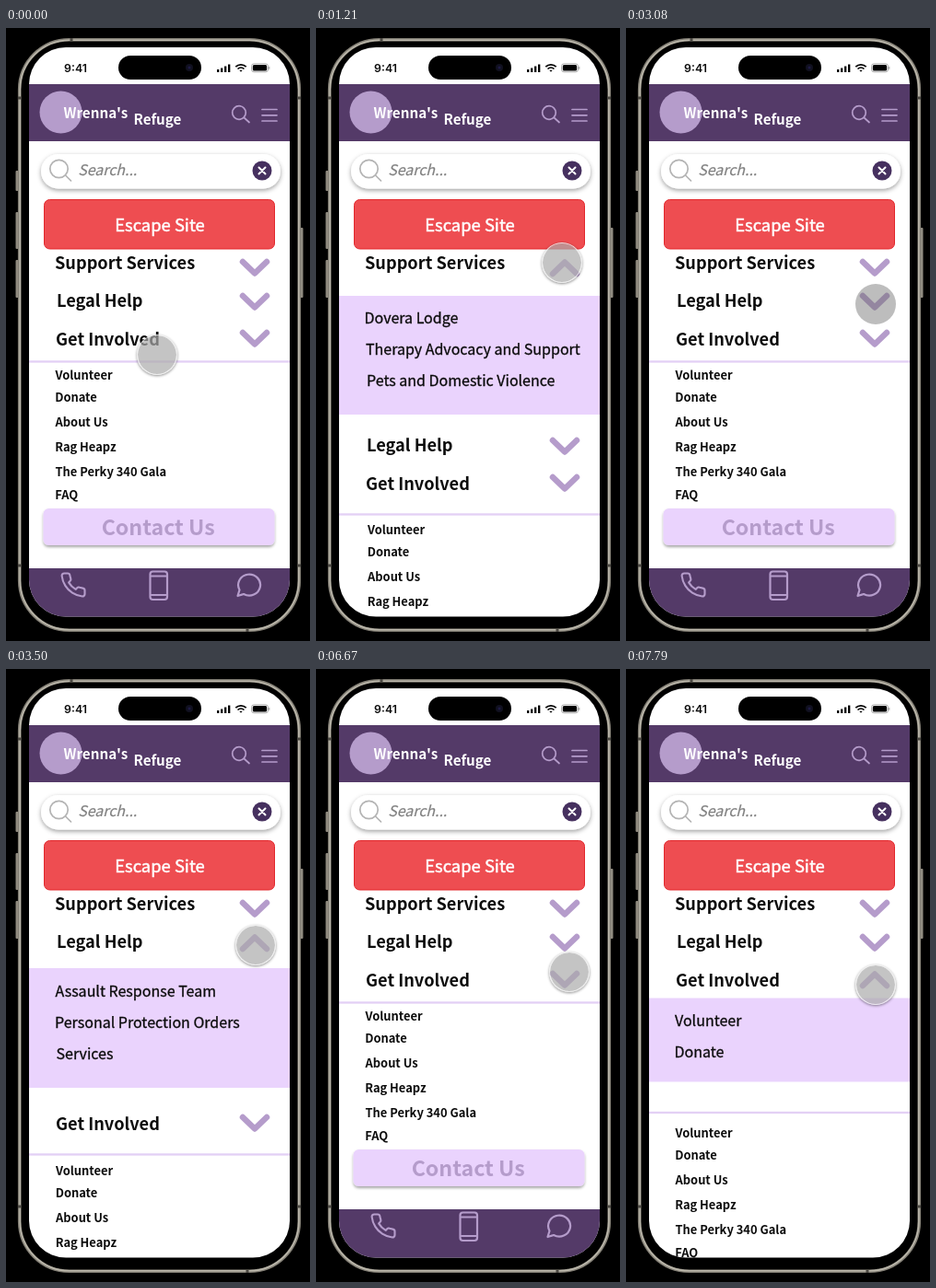
Animation, 330 px wide and 666 px high, one loop 8 s. Source, as an HTML page:

```html
<!DOCTYPE html>
<html lang="en">
<head>
<meta charset="utf-8">
<title>Accordion menu</title>
<style>
  /* Open amount of each section, and whether the pointer is pressed */
  @property --services { syntax: "<number>"; inherits: true; initial-value: 0; }
  @property --legal { syntax: "<number>"; inherits: true; initial-value: 0; }
  @property --involved { syntax: "<number>"; inherits: true; initial-value: 0; }
  @property --press { syntax: "<number>"; inherits: true; initial-value: 0; }

  html, body { margin: 0; width: 100%; height: 100%; overflow: hidden; background: #000; }
  body {
    --ease: cubic-bezier(.2, .6, .35, 1);
    position: relative;
    animation: services 8s var(--ease) infinite, legal 8s var(--ease) infinite,
      involved 8s var(--ease) infinite, press 8s step-end infinite;
  }
  svg { position: absolute; left: 0; top: 0; display: block; }

  @keyframes services {
    0%, 12% { --services: 0; }
    15.1%, 26.13% { --services: 1; }
    27.63%, 100% { --services: 0; }
  }
  @keyframes legal {
    0%, 40.63% { --legal: 0; }
    43.7%, 76.13% { --legal: 1; }
    77.63%, 100% { --legal: 0; }
  }
  @keyframes involved {
    0%, 94.25% { --involved: 0; }
    97.35%, 100% { --involved: 1; }
  }
  @keyframes press {
    0%, 13.1%, 26.6%, 40.6%, 76.6%, 92.7%, 100% { --press: 0; }
    11%, 24.45%, 38.5%, 74.45%, 90.6% { --press: 1; }
  }

  .services { opacity: var(--services); }
  .legal { opacity: var(--legal); }
  .involved { opacity: var(--involved); }
  .row-legal { transform: translateY(calc(var(--services) * 157px)); }
  .row-involved { transform: translateY(calc(var(--services) * 157px + var(--legal) * 156px)); }
  .rule { transform: translateY(calc(var(--services) * 166px + var(--legal) * 165px + var(--involved) * 119.5px)); }
  .links {
    transform: translate(
      calc(var(--services) * 2.5px + var(--legal) * .5px),
      calc(var(--services) * 168px + var(--legal) * 167.5px + var(--involved) * 127px));
  }
  .flip-services { transform: rotate(calc(var(--services) * 180deg)); }
  .flip-legal { transform: rotate(calc(var(--legal) * 180deg)); }
  .flip-involved { transform: rotate(calc(var(--involved) * 180deg)); }

  text { font-family: "Noto Sans CJK JP", "Noto Sans CJK SC", "Noto Sans CJK", "Noto Sans", sans-serif; fill: #0c0c0c; }
  .head { font-size: 18.2px; font-weight: 700; }
  .item { font-size: 16px; stroke: #0c0c0c; stroke-width: .3; }
  .link { font-size: 12.9px; font-weight: 700; }
  .brand { font-size: 15.2px; font-weight: 700; fill: #fff; }
  .contact { font-size: 23.2px; font-weight: 700; fill: #b59ccb; }
  .escape { font-size: 18.4px; fill: #fff; stroke: #fff; stroke-width: .5; }
  .hint { font-size: 15.9px; font-style: italic; fill: #808080; stroke: #808080; stroke-width: .2; }
  .clock { font: 600 12.3px Inter, "Liberation Sans", sans-serif; }
  .mid { text-anchor: middle; }
  .icon { fill: none; stroke: #b59ccb; stroke-width: 1.7; stroke-linecap: round; stroke-linejoin: round; }
  .bold { stroke-width: 2.2; }
  .plum { fill: #543a68; }
  .lilac { fill: #b59ccb; }
  .pale { fill: #ead3fd; }

  .pointer {
    position: absolute; left: -22px; top: -22px; width: 44px; height: 44px;
    animation: move 8s linear infinite;
  }
  .pointer i { position: absolute; inset: 0; border-radius: 50%; box-sizing: border-box; }
  .rest {
    opacity: calc(1 - var(--press));
    background: rgba(171, 171, 171, .7); background-clip: padding-box;
    border: 1px solid rgba(235, 235, 235, .9);
    box-shadow: 0 1px 3px rgba(0, 0, 0, .45);
  }
  .pressed { opacity: var(--press); background: rgba(110, 110, 110, .45); }
  @keyframes move {
    0%, 2.25% { transform: translate(164px, 355px); }
    3.9% { transform: translate(153.2px, 363px); }
    4.9% { transform: translate(154.2px, 356.6px); }
    5.56% { transform: translate(171px, 335.8px); }
    6.23% { transform: translate(199px, 307px); }
    7.23% { transform: translate(238.7px, 273.8px); }
    8.88%, 28.63% { transform: translate(267px, 255px); }
    30.31% { transform: translate(272.6px, 256px); }
    31.25% { transform: translate(278px, 261px); }
    32.68% { transform: translate(279.4px, 282px); }
    34.2% { transform: translate(275px, 295px); }
    36.88%, 81.25% { transform: translate(271px, 300px); }
    83.38% { transform: translate(275px, 329px); }
    85% { transform: translate(274px, 339px); }
    88.5%, 100% { transform: translate(271px, 343px); }
  }
</style>
</head>
<body>
<svg width="330" height="666" viewBox="0 0 330 666">
  <defs>
    <clipPath id="screen"><rect x="25" y="21" width="283" height="618.5" rx="40"/></clipPath>
    <path id="chevron" d="M-13-6.5 0 6 13-6.5" fill="none" stroke="#b59ccb" stroke-width="6.5" stroke-linecap="round" stroke-linejoin="round"/>
    <filter id="soft" x="-10%" y="-30%" width="120%" height="170%">
      <feDropShadow dx="0" dy="2" stdDeviation="1.8" flood-opacity=".35"/>
    </filter>
    <filter id="wide" x="-10%" y="-40%" width="120%" height="190%">
      <feDropShadow dx="0" dy="2" stdDeviation="2.8" flood-opacity=".38"/>
    </filter>
  </defs>

  <!-- Phone body -->
  <rect width="330" height="666"/>
  <g fill="#928d82">
    <rect x="10.5" y="155" width="3" height="22" rx="1"/>
    <rect x="10.5" y="200" width="3" height="40" rx="1"/>
    <rect x="10.5" y="252" width="3" height="41" rx="1"/>
    <rect x="319.5" y="217" width="3" height="76" rx="1"/>
  </g>
  <rect x="14.7" y="12.7" width="303.6" height="641.6" rx="54" stroke="#858177" stroke-width="3.6"/>
  <rect x="15.2" y="13.2" width="302.6" height="640.6" rx="53.5" fill="none" stroke="#bab6aa" stroke-width="1.6"/>
  <path d="M12.9 76h3.6M316.5 76h3.6M12.9 584h3.6M316.5 584h3.6M71 10.9v3.6M262 652.5v3.6" stroke="#4b4842" stroke-width="3"/>

  <g clip-path="url(#screen)">
    <rect x="24" y="20" width="285" height="621" fill="#fff"/>

    <!-- Section panels -->
    <g class="services">
      <rect class="pale" x="25" y="291" width="283" height="129"/>
      <text class="item" x="52.5" y="321">Dovera Lodge</text>
      <text class="item" x="54" y="355">Therapy Advocacy and Support</text>
      <text class="item" x="55" y="389">Pets and Domestic Violence</text>
    </g>
    <g class="legal">
      <rect class="pale" x="25" y="325" width="283" height="130"/>
      <text class="item" x="53.5" y="356">Assault Response Team</text>
      <text class="item" x="53" y="390">Personal Protection Orders</text>
      <text class="item" x="54.5" y="424">Services</text>
    </g>
    <g class="involved">
      <rect class="pale" x="25" y="357.5" width="283" height="91"/>
      <text class="item" x="53" y="388">Volunteer</text>
      <text class="item" x="52.5" y="422">Donate</text>
    </g>

    <!-- Section rows -->
    <text class="head" x="53" y="262">Support Services</text>
    <g transform="translate(270 260.5)"><use class="flip-services" href="#chevron"/></g>
    <g class="row-legal">
      <text class="head" x="55" y="303">Legal Help</text>
      <g transform="translate(270 297.5)"><use class="flip-legal" href="#chevron"/></g>
    </g>
    <g class="row-involved">
      <text class="head" x="54" y="345">Get Involved</text>
      <g transform="translate(270 337.5)"><use class="flip-involved" href="#chevron"/></g>
    </g>

    <!-- Footer -->
    <rect class="rule" x="25" y="361.3" width="283" height="2.3" fill="#e3d0f5"/>
    <g class="links">
      <text class="link" x="53.5" y="382">Volunteer</text>
      <text class="link" x="53.2" y="406">Donate</text>
      <text class="link" x="53.5" y="433">About Us</text>
      <text class="link" x="53.2" y="460">Rag Heapz</text>
      <text class="link" x="53.5" y="487">The Perky 340 Gala</text>
      <text class="link" x="53.2" y="512">FAQ</text>
      <rect class="pale" x="40.5" y="522" width="251" height="40" rx="6" filter="url(#soft)"/>
      <text class="contact mid" x="165.2" y="551">Contact Us</text>
      <rect class="plum" x="20" y="587" width="292" height="60"/>
      <g class="icon bold">
        <path transform="translate(58 590) scale(1.25)" stroke-width="1.7" d="M22 17v3a2 2 0 0 1-2.2 2 19.8 19.8 0 0 1-8.6-3.1 19.5 19.5 0 0 1-6-6A19.8 19.8 0 0 1 2.1 4.2 2 2 0 0 1 4.1 2h3a2 2 0 0 1 2 1.7c.1 1 .4 1.9.7 2.8a2 2 0 0 1-.5 2.1L8.1 9.9a16 16 0 0 0 6 6l1.3-1.3a2 2 0 0 1 2.1-.4c.9.3 1.9.6 2.8.7A2 2 0 0 1 22 17z"/>
        <rect x="156.5" y="590.5" width="18.5" height="30.5" rx="3"/>
        <path d="M157 595.5h18M157 616h18"/>
        <path d="M251.5 617l2-6.5a12 11.5 0 1 1 4.5 4.5z"/>
      </g>
    </g>

    <!-- Header -->
    <rect class="plum" x="25" y="61" width="283" height="62"/>
    <circle class="lilac" cx="59.5" cy="91.5" r="23"/>
    <text class="brand" x="62.5" y="97.5">Wrenna's</text>
    <text class="brand" x="138.5" y="105">Refuge</text>
    <g class="icon">
      <circle cx="253" cy="92" r="7.3"/>
      <path d="M258.5 97.5l5.5 5M278 88.5h16M278 94.8h16M278 101h16"/>
    </g>

    <!-- Search -->
    <rect x="38" y="137" width="260" height="37.5" rx="18.75" fill="#fff" filter="url(#wide)"/>
    <g fill="none" stroke="#b4b4b4" stroke-width="1.7" stroke-linecap="round">
      <circle cx="57.5" cy="153" r="9.7"/>
      <path d="M64.5 160l6 6"/>
    </g>
    <text class="hint" x="78.3" y="160">Search...</text>
    <circle cx="278" cy="155" r="10.5" fill="#46305f"/>
    <path d="M274.5 151.5l7 7m0-7l-7 7" stroke="#fff" stroke-width="2" stroke-linecap="round"/>

    <rect x="41.5" y="186.5" width="250" height="53.5" rx="6" fill="#ee4d51" stroke="#e2262b"/>
    <text class="escape mid" x="167" y="221">Escape Site</text>

    <!-- Status bar -->
    <text class="clock mid" x="75.5" y="47.5">9:41</text>
    <rect x="122" y="30" width="90" height="26" rx="13"/>
    <circle cx="199" cy="43" r="4" fill="#10101f"/>
    <circle cx="199" cy="43" r="1.5" fill="#1e1a45"/>
    <path d="M230.2 48v-3M234.2 48v-4.5M238.2 48v-6.5M242.2 48v-8.5" stroke="#000" stroke-width="2.3"/>
    <g fill="none" stroke="#000" stroke-width="1.7">
      <path d="M249.3 42.2a8 8 0 0 1 11.4 0M251.5 44.5a5 5 0 0 1 7 0"/>
      <path d="M253.3 45.8h3.4L255 47.8z" fill="#000" stroke="none"/>
    </g>
    <rect x="266.5" y="38.8" width="18" height="9" rx="2.7" fill="none" stroke="#999" stroke-width=".8"/>
    <rect x="267.8" y="40.1" width="15.4" height="6.4" rx="1.6"/>
    <path d="M285.8 42v2.8" stroke="#999"/>
  </g>
</svg>
<div class="pointer"><i class="rest"></i><i class="pressed"></i></div>
</body>
</html>
```
